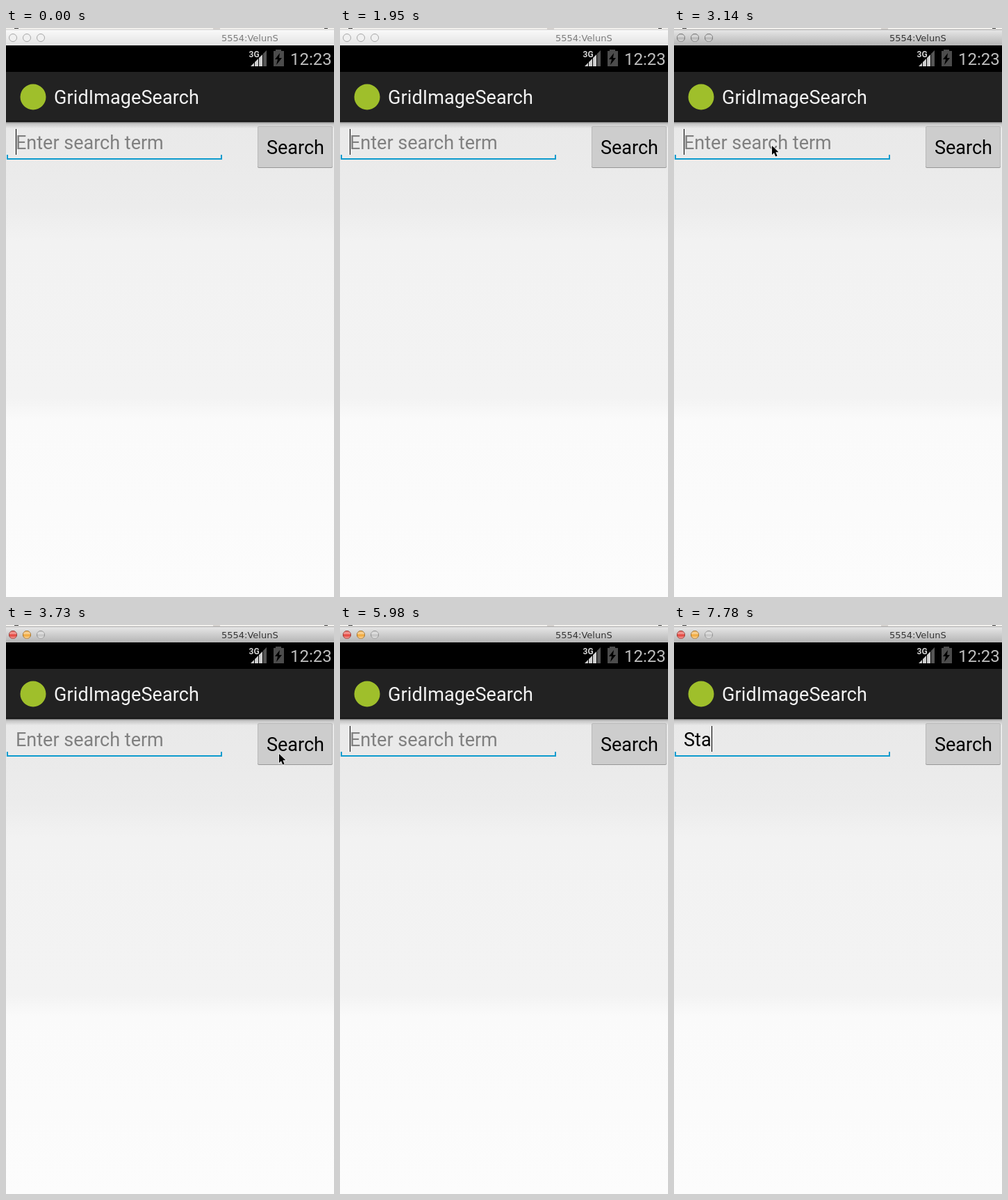
Write an HTML page that moves like this. It is 472x817 px and loops after 8000 ms.

```html
<!DOCTYPE html>
<html lang="en">
<head>
<meta charset="utf-8">
<title>Grid image search</title>
<style>
  html, body { margin: 0; width: 100%; height: 100%; overflow: hidden; background: #fbfbfb; }
  svg { display: block; width: 472px; height: 817px; }
  text { font-family: Roboto, sans-serif; font-size: 27px; white-space: pre; }
  .window-name { font: 13px "DejaVu Sans", sans-serif; fill: #7c7c7c; }
  .clock { font-size: 24px; fill: #bebebe; }
  .network { font-size: 12px; font-weight: bold; fill: #d0d0d0; }
  .app-name { fill: #f3f3f3; letter-spacing: .1px; }

  .window-name, .focused, .lit, .unlit, .hint, .typed tspan, .caret, .blink, .pointer {
    animation: 8s step-end infinite;
  }
  .window-name { animation-name: title-focus; }
  .focused { animation-name: focus; }
  .unlit { animation-name: unlit; }
  .lit { animation-name: lit; }
  .hint { animation-name: hint; }
  .typed .k1 { animation-name: key1; }
  .typed .k2 { animation-name: key2; }
  .typed .k3 { animation-name: key3; }
  .caret { animation-name: caret; }
  .blink { animation-name: blink; }
  .pointer { animation-name: pointer; }

  @keyframes title-focus { 0% { fill: #7c7c7c; } 39.25%, 100% { fill: #333; } }
  @keyframes focus { 0% { opacity: 0; } 39.25%, 100% { opacity: 1; } }
  @keyframes unlit { 0% { opacity: 0; } 39.25% { opacity: 1; } 41.125%, 100% { opacity: 0; } }
  @keyframes lit { 0% { opacity: 0; } 41.125%, 100% { opacity: 1; } }
  @keyframes hint { 0% { opacity: 1; } 87.875%, 100% { opacity: 0; } }
  @keyframes key1 { 0% { fill-opacity: 0; } 87.875%, 100% { fill-opacity: 1; } }
  @keyframes key2 { 0% { fill-opacity: 0; } 95.375%, 100% { fill-opacity: 1; } }
  @keyframes key3 { 0% { fill-opacity: 0; } 97.25%, 100% { fill-opacity: 1; } }
  @keyframes caret {
    0% { transform: translateX(14px); }
    87.875% { transform: translateX(30px); }
    95.375% { transform: translateX(39px); }
    97.25%, 100% { transform: translateX(54px); }
  }
  @keyframes blink {
    0%, 11.25%, 24.375%, 37.375%, 50.375%, 63.5%, 74.75%, 100% { opacity: 1; }
    5.625%, 18.75%, 30%, 42.875%, 56%, 69.125% { opacity: 0; }
  }
  @keyframes pointer {
    0% { opacity: 0; transform: translate(255px, 182px); }
    30% { opacity: 1; transform: translate(255px, 182px); }
    31.75% { opacity: 1; transform: translate(141px, 169px); }
    41.125% { opacity: 1; transform: translate(143px, 171px); }
    42.875% { opacity: 1; transform: translate(144px, 171px); }
    44.75% { opacity: 1; transform: translate(263px, 173px); }
    46.625% { opacity: 1; transform: translate(393px, 185px); }
    48.5% { opacity: 1; transform: translate(439px, 186px); }
    50.375%, 100% { opacity: 0; transform: translate(439px, 186px); }
  }
</style>
</head>
<body>
<svg viewBox="0 0 472 817">
  <defs>
    <linearGradient id="page" gradientUnits="userSpaceOnUse" x1="0" y1="135" x2="0" y2="817">
      <stop offset="0" stop-color="#e9e9e9"/>
      <stop offset=".18" stop-color="#ececec"/>
      <stop offset=".25" stop-color="#f2f2f2"/>
      <stop offset=".58" stop-color="#f3f3f3"/>
      <stop offset=".625" stop-color="#fafafa"/>
      <stop offset="1" stop-color="#fcfcfc"/>
    </linearGradient>
    <linearGradient id="shadow" x2="0" y2="1">
      <stop offset="0" stop-opacity=".5"/>
      <stop offset=".25" stop-opacity=".16"/>
      <stop offset="1" stop-opacity="0"/>
    </linearGradient>
    <linearGradient id="bar-idle" x2="0" y2="1">
      <stop offset="0" stop-color="#fafafa"/>
      <stop offset="1" stop-color="#e3e3e3"/>
    </linearGradient>
    <linearGradient id="bar-focus" x2="0" y2="1">
      <stop offset="0" stop-color="#e8e8e8"/>
      <stop offset="1" stop-color="#b5b5b5"/>
    </linearGradient>
    <linearGradient id="gloss" x2="0" y2="1">
      <stop offset="0" stop-color="#fff" stop-opacity=".15"/>
      <stop offset=".3" stop-color="#fff" stop-opacity=".5"/>
      <stop offset=".55" stop-color="#fff" stop-opacity="0"/>
      <stop offset="1" stop-color="#fff" stop-opacity=".5"/>
    </linearGradient>
    <circle id="bulb" cy="14" r="5.5"/>
  </defs>

  <rect width="472" height="817" fill="url(#page)"/>

  <!-- window frame -->
  <rect width="472" height="3" fill="#f1efec"/>
  <rect x="298" width="10" height="3" fill="#d4d0cd"/>
  <path d="M12 .5h6M458 .5h5" stroke="#333"/>
  <rect y="2" width="472" height="23" fill="url(#bar-idle)"/>
  <path d="M0 2.5H472" stroke="#d2d2d2"/>
  <g fill="#f0f0f0" stroke="#a8a8a8">
    <use href="#bulb" x="10"/><use href="#bulb" x="30"/><use href="#bulb" x="50"/>
  </g>
  <g class="focused">
    <rect y="2" width="472" height="23" fill="url(#bar-focus)"/>
    <path d="M0 2.5H472" stroke="#a9a9a9"/>
    <g fill="#c4c4c4" stroke="#8d8d8d">
      <use href="#bulb" x="10"/><use href="#bulb" x="30"/><use href="#bulb" x="50"/>
    </g>
    <g class="unlit" fill="#b8b8b8" stroke="#777">
      <use href="#bulb" x="10"/><use href="#bulb" x="30"/><use href="#bulb" x="50"/>
    </g>
    <g class="lit">
      <use href="#bulb" x="10" fill="#e5443c" stroke="#9c3630"/>
      <use href="#bulb" x="30" fill="#f2a93a" stroke="#a97429"/>
    </g>
    <g fill="url(#gloss)">
      <use href="#bulb" x="10"/><use href="#bulb" x="30"/><use href="#bulb" x="50"/>
    </g>
  </g>
  <text class="window-name" x="310" y="19">5554:VelunS</text>

  <!-- status bar -->
  <rect y="25" width="472" height="38"/>
  <path d="M352 55l5-5v5zM358 55v-6l5-5v11zM364 55V43l5-5v17z" fill="#d0d0d0"/>
  <path d="M370 55V37l5-5v23z" fill="#555"/>
  <text class="network" x="349.5" y="42">3G</text>
  <path d="M388 31h8v2h4v22h-15V33h3z" fill="#4c4c4c"/>
  <path d="M394 36l-7 9h4l-2 8 8-10h-4z"/>
  <text class="clock" x="409" y="53">12:23</text>

  <!-- action bar -->
  <rect y="63" width="472" height="72" fill="#222"/>
  <path d="M0 134H472" stroke="#191919" stroke-width="2"/>
  <circle cx="39" cy="99" r="18.5" fill="#9fbf2b"/>
  <text class="app-name" x="69" y="109">GridImageSearch</text>
  <rect y="135" width="472" height="9" fill="url(#shadow)"/>

  <!-- search row -->
  <path d="M2 182v6H310v-6" fill="none" stroke="#0d9bce" stroke-width="2"/>
  <text class="hint" x="14" y="174" fill="#808080">Enter search term</text>
  <text class="typed" x="14" y="174"><tspan class="k1">S</tspan><tspan class="k2">t</tspan><tspan class="k3">a</tspan></text>
  <g class="caret"><rect class="blink" y="145" width="1" height="37"/></g>
  <rect x="362" y="142" width="108" height="59" rx="2" fill="#979797"/>
  <rect x="362" y="141" width="108" height="59" rx="2" fill="#b9b9b9"/>
  <rect x="363" y="142" width="106" height="58" rx="1" fill="#cdcdcd"/>
  <text x="375" y="181">Search</text>

  <path class="pointer" d="M0 0V13L3 10.2 5.2 15.4 7.6 14.4 5.4 9.3H9.5Z" stroke="#fff" stroke-width="1.2" paint-order="stroke"/>
</svg>
</body>
</html>
```
